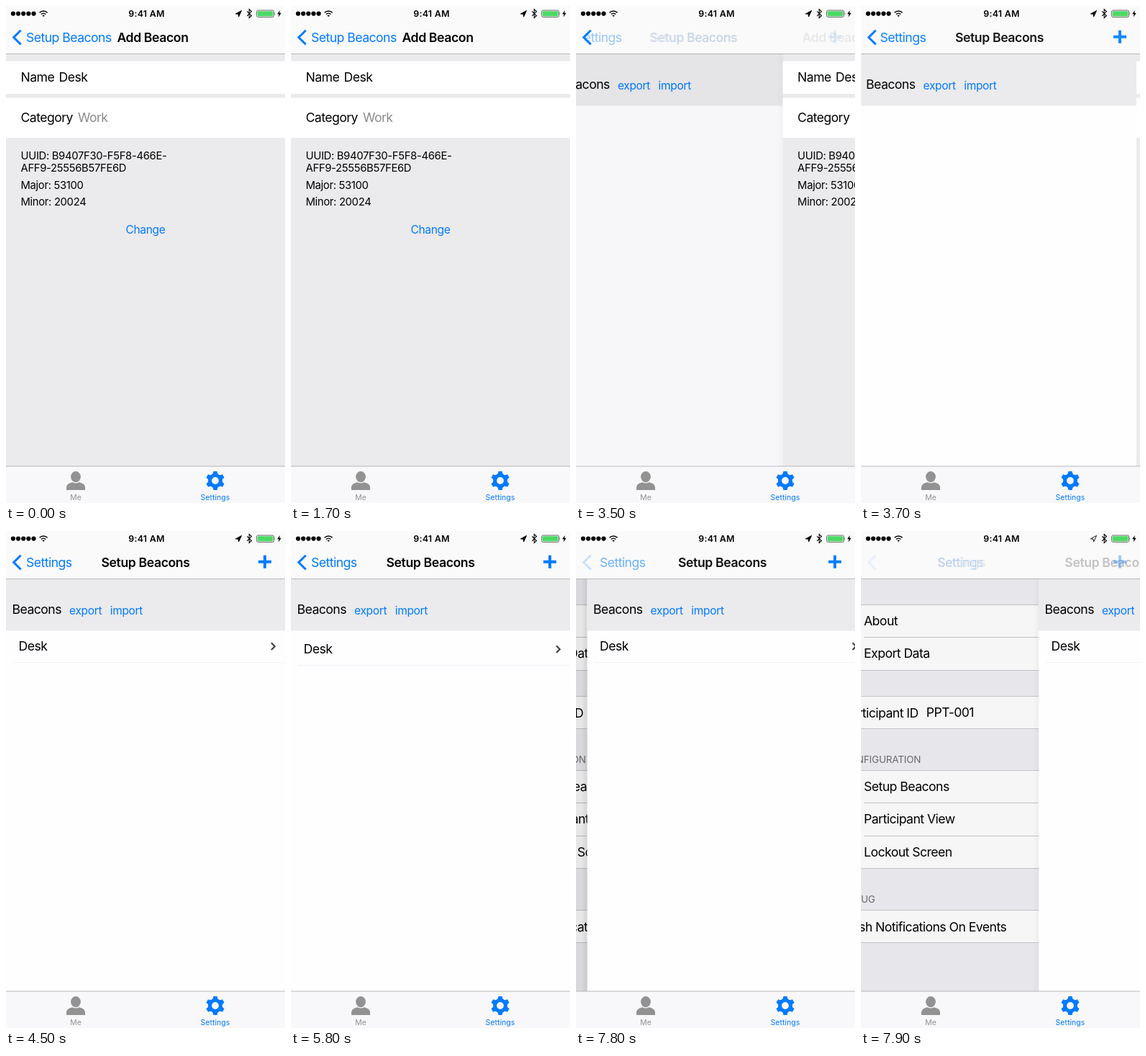
Recreate the animation shown at these times as an HTML page. Size 388 px wide and 690 px high, loop 8 s.

```html
<!DOCTYPE html>
<html lang="en">
<head>
<meta charset="utf-8">
<title>Beacon setup</title>
<style>
html, body { margin: 0; height: 100%; overflow: hidden; background: #fff; }
svg { display: block; width: 100%; height: 100%; }
text { font: 17.6px Inter, Roboto, sans-serif; letter-spacing: -.03em; fill: #000; white-space: pre; }
.mid { text-anchor: middle; }
.end { text-anchor: end; }
.bold { font-weight: 600; letter-spacing: -.021em; }
.small { font-size: 15.5px; letter-spacing: -.02em; }
.info { font-size: 14.8px; letter-spacing: -.021em; }
.head { font-size: 13.4px; letter-spacing: -.01em; fill: #6d6d72; }
.tab { font-size: 10.4px; letter-spacing: .01em; }
.clock { font-size: 12.4px; letter-spacing: .02em; }
.blue { fill: #007aff; }
.gray { fill: #929292; }
.line { fill: none; stroke: #007aff; }
.edge { fill: #a9a9ac; }
</style>
</head>
<body>
<svg viewBox="0 0 388 690">
  <defs>
    <linearGradient id="fade"><stop stop-opacity="0"/><stop offset="1" stop-opacity=".09"/></linearGradient>
    <clipPath id="backClip"><rect x="11" y="20" width="377" height="46"/></clipPath>
  </defs>

  <g id="settings">
    <rect y="66" width="388" height="574" fill="#efeff4"/>
    <g id="rows"></g>
    <text x="46.3" y="130.5">About</text>
    <text x="46.3" y="176">Export Data</text>
    <text x="122" y="258.5" class="end">Participant ID</text>
    <text x="133" y="258">PPT-001</text>
    <text x="125.5" y="322" class="head end">CONFIGURATION</text>
    <text x="46.3" y="360.5">Setup Beacons</text>
    <text x="46.3" y="406">Participant View</text>
    <text x="46.3" y="451.5">Lockout Screen</text>
    <text x="62" y="516" class="head end">DEBUG</text>
    <text x="244.5" y="555.5" class="end">Push Notifications On Events</text>
    <rect id="settingsDim" y="66" width="388" height="574"/>
  </g>

  <g id="list">
    <rect id="listShade" x="-8" y="67" width="8" height="573" fill="url(#fade)"/>
    <rect y="66" width="388" height="574" fill="#fefdff"/>
    <g id="row">
      <text x="17.5" y="166">Desk</text>
      <path d="M369 155.3l4.8 4.9-4.8 4.9" fill="none" stroke="#444" stroke-width="2.2"/>
      <path d="M10 182.5H388" stroke="#f1f0f3"/>
    </g>
    <rect y="66" width="388" height="72.5" fill="#ebeaec"/>
    <text x="8.5" y="115">Beacons</text>
    <text x="88" y="115.5" class="small blue">export</text>
    <text x="144.7" y="115.5" class="small blue">import</text>
    <rect id="listDim" y="66" width="388" height="574"/>
  </g>

  <g id="add">
    <rect id="addShade" x="-8" y="67" width="8" height="573" fill="url(#fade)"/>
    <rect y="66" width="388" height="574" fill="#ebeaec"/>
    <path d="M0 76.5H388V122H0zM0 127.5H388V183H0z" fill="#fff"/>
    <text x="20.5" y="104.5">Name</text>
    <text x="73.5" y="104.5">Desk</text>
    <text x="20.5" y="160.5">Category</text>
    <text x="100" y="160.5" style="fill:#8a8a8c">Work</text>
    <text x="20.5" y="213" class="info">UUID: B9407F30-F5F8-466E-</text>
    <text x="20.5" y="230" class="info">AFF9-25556B57FE6D</text>
    <text x="20.5" y="253.5" class="info">Major: 53100</text>
    <text x="20.5" y="277.3" class="info">Minor: 20024</text>
    <text x="194" y="315.5" class="small mid blue">Change</text>
  </g>

  <rect width="388" height="66.2" fill="#fafafb"/>
  <rect class="edge" y="66.1" width="388" height=".8"/>
  <path id="chevron" class="line" stroke-width="2.9" d="M20.6 33.8L10.6 43.6 20.6 53.4"/>
  <g clip-path="url(#backClip)">
    <text id="backAdd" y="49.7" class="blue">Setup Beacons</text>
    <text id="backList" y="49.7" class="blue">Settings</text>
  </g>
  <text id="titleAdd" y="49.7" class="bold mid">Add Beacon</text>
  <text id="titleList" y="49.7" class="bold mid">Setup Beacons</text>
  <text id="titleSettings" y="49.7" class="bold mid">Settings</text>
  <path id="plus" class="line" stroke-width="4" d="M351 42.7h18M360 33.7v18"/>

  <g id="dots"></g>
  <g fill="none" stroke="#000" stroke-width="1.6">
    <path d="M46.6 9.2a7.8 7.8 0 0 1 11 0M48.9 11.5a4.6 4.6 0 0 1 6.4 0"/>
    <path d="M50.3 13.1L52.1 15.1 53.9 13.1Q52.1 11.9 50.3 13.1z" fill="#000" stroke="none"/>
    <path d="M335.2 7.3l6.2 6.2-3.2 3V4.6l3.2 3-6.2 6.2" stroke-width="1.1"/>
    <rect x="348.6" y="6" width="24" height="9.4" rx="2" stroke="#555" stroke-width=".9"/>
    <rect x="349.8" y="7.2" width="21.6" height="7" rx="1" fill="#4cd964" stroke="none"/>
    <path d="M373.6 9q1.6 1.7 0 3.4z" fill="#555" stroke="none"/>
    <path d="M380.8 6l-3.6 5.2h2.4l-.8 4.2 4-5.6h-2.5z" fill="#000" stroke="none"/>
    <path id="arrow" d="M319.3 10.9L327.6 6.4 323.6 15 323 11.2z" stroke-width=".9"/>
  </g>
  <text x="195.5" y="15" class="bold mid clock">9:41 AM</text>

  <rect y="639" width="388" height="51" fill="#f8f7f9"/>
  <rect class="edge" y="638.6" width="388" height=".8"/>
  <path class="gray" d="M84 672v-3q0-5.5 6-7l3-1h8l3 1q6 1.5 6 7v3z"/>
  <ellipse class="gray" cx="97" cy="653.6" rx="7.6" ry="8.3" stroke="#f8f7f9" stroke-width="1.4"/>
  <text x="97" y="686" class="tab mid gray">Me</text>
  <g id="gear" transform="translate(291 659)">
    <circle r="7.4" class="line" stroke-width="5"/>
  </g>
  <text x="291" y="686" class="tab mid blue">Settings</text>
</svg>
<script>
const LOOP = 8000, WIDTH = 388, STEP = 100;
const $ = id => document.getElementById(id);
const add = (id, markup) => $(id).insertAdjacentHTML('beforeend', markup);

for (let i = 0; i < 5; i++) add('dots', `<circle cx="${9.9 + i * 7.15}" cy="10.6" r="3.1"/>`);
for (let i = 0; i < 6; i++)
  add('gear', `<path d="M-4.6-8L-3.2-10-2.6-13H2.6L3.2-10 4.6-8z" class="blue" transform="rotate(${i * 60})"/>`);

// Grouped table: top edge and row count of each section
for (const [top, count] of [[103, 2], [230, 1], [333, 3], [526.5, 1]]) {
  const h = 45.4 * count;
  add('rows', `<rect y="${top}" width="388" height="${h}" fill="#fff"/>`);
  for (let i = 0; i <= count; i++) {
    const inset = i % count ? 46 : 0;
    add('rows', `<path d="M${inset} ${Math.round(top + i * 45.4) - .5}H388" stroke="#c8c7cc"/>`);
  }
}

const mix = (a, b, p) => a + (b - a) * p;
const spring = (t, start, rate) => {
  const u = Math.max(0, t - start) * rate;
  return 1 - (1 + u) * Math.exp(-u);
};
const move = (id, x, y = 0) => $(id).setAttribute('transform', `translate(${x} ${y})`);
const alpha = (id, a) => $(id).setAttribute('opacity', a);
const label = (id, x, a) => { $(id).setAttribute('x', x); alpha(id, a); };

function draw(t) {
  const p = spring(t, 3357, .0185);   // add -> list
  const q = spring(t, 7783, .0185);   // list -> settings
  const pressed1 = t >= 3300 && t < 3400, pressed2 = t >= 7700;

  move('add', WIDTH * p);
  move('list', -.3 * WIDTH * (1 - p) + WIDTH * q);
  move('settings', -.3 * WIDTH * (1 - q));
  alpha('listDim', .1 * (1 - p));
  alpha('settingsDim', .1 * (1 - q));
  alpha('addShade', 1 - p);
  alpha('listShade', q ? 1 - q : 0);

  const pull = t < 5800 ? 0 : 4 * (1 - spring(t, 5800, .008));
  move('row', 0, pull);
  alpha('row', t >= 3860 ? 1 : 0);

  label('backAdd', mix(28, 131, p), pressed1 ? .13 : p ? .5 * (1 - p) : 1);
  label('titleAdd', mix(204, 420, p), (1 - p) ** 2);
  label('backList', mix(-80, 28, p) + 123 * q, pressed2 ? (q ? .6 * (1 - q) : .17) : p ** 3);
  label('titleList', mix(75, 194, p) + 237 * q, p ** 8 * (1 - q) ** 1.5);
  label('titleSettings', mix(45, 194, q), q ** 6);
  alpha('chevron', pressed1 ? .17 : pressed2 ? .2 * (1 - q) : 1);
  alpha('plus', p ** 8 * (1 - q));
  $('arrow').setAttribute('fill', t >= 7900 ? 'none' : '#000');
}

// The screen refreshes ten times a second
function tick() {
  draw(Math.floor(performance.now() % LOOP / STEP) * STEP);
  requestAnimationFrame(tick);
}
tick();
</script>
</body>
</html>
```
